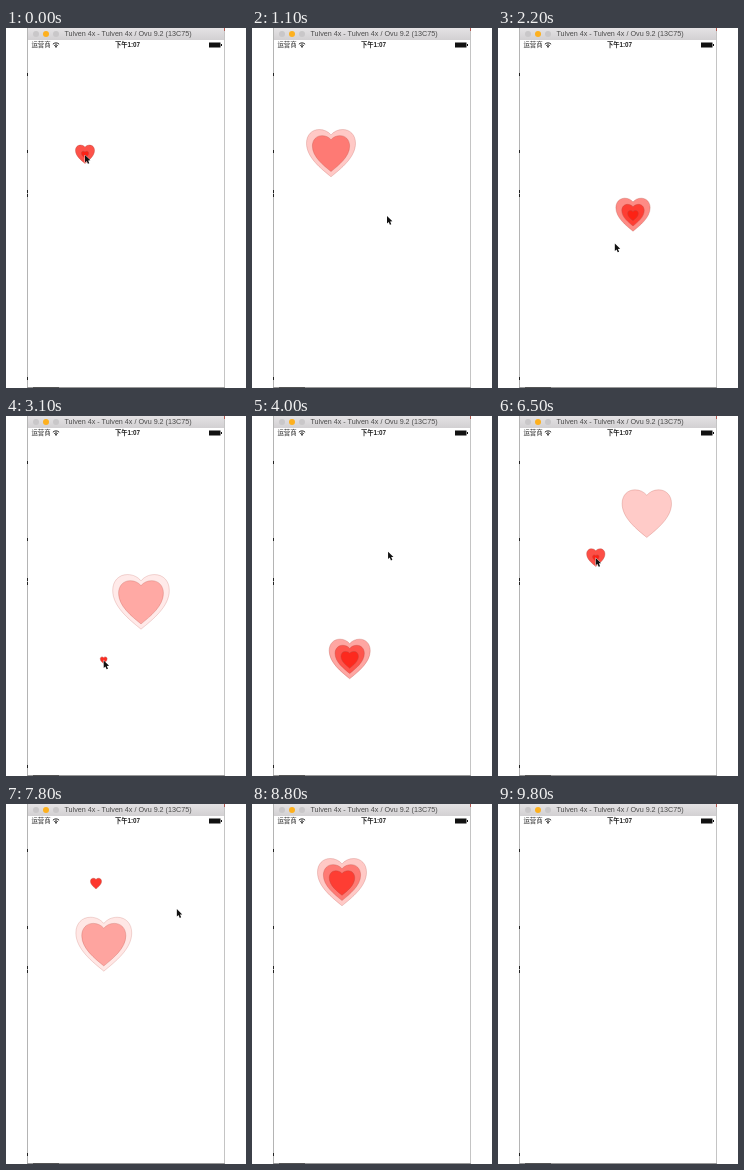
Write an HTML page with a canvas that moves like this. It is 240 by 360 pixels and loops after 10000 ms.

```html
<!DOCTYPE html>
<html>
<head>
<meta charset="utf-8">
<title>Heart taps</title>
<style>
  html, body { margin: 0; width: 100%; height: 100%; overflow: hidden; background: #fff; }
  canvas { position: absolute; left: 0; top: 0; width: 240px; height: 360px; }
  span {
    position: absolute; white-space: nowrap; line-height: 10px;
    transform: translateX(-50%); color: #222;
    font-family: "Liberation Sans", "Noto Sans CJK SC", "Noto Sans CJK", sans-serif;
  }
  .title { left: 122px; top: 1px; font-size: 7.2px; color: #4a4a4a; }
  .carrier { left: 35px; top: 12px; font-size: 6.4px; }
  .clock { left: 121.5px; top: 12px; font-size: 6.3px; font-weight: bold; }
</style>
</head>
<body>
<canvas id="stage"></canvas>
<span class="title">Tulven 4x - Tulven 4x / Ovu 9.2 (13C75)</span>
<span class="carrier">运营商</span>
<span class="clock">下午1:07</span>
<script>
const canvas = document.getElementById('stage');
const ctx = canvas.getContext('2d');
const dpr = window.devicePixelRatio || 1;
canvas.width = 240 * dpr;
canvas.height = 360 * dpr;

const LOOP = 10000, STEP = 100, LAST = 9800;
const SPEED = 38, MAX_SIZE = 60, STAGGER = 0.31, WAVES = 3;

// Each tap sends out growing hearts and is a stop of the pointer
const taps = [
  { t: -0.5, x: 79, y: 127 },
  { t: 1.3, x: 135, y: 188 },
  { t: 2.92, x: 97.7, y: 244.5 },
  { t: 4.58, x: 148.8, y: 99.5 },
  { t: 6.02, x: 97.8, y: 142.3 },
  { t: 7.51, x: 90, y: 80 }
];
const exit = { t: 8.01, x: 235, y: 125 };
const stops = [...taps, exit];

// Heart of unit width, growing around the tap point
const heart = new Path2D();
for (const s of [-1, 1]) {
  heart.moveTo(0, -0.41);
  heart.bezierCurveTo(s * 0.06, -0.48, s * 0.14, -0.52, s * 0.24, -0.52);
  heart.bezierCurveTo(s * 0.39, -0.52, s * 0.5, -0.41, s * 0.5, -0.24);
  heart.bezierCurveTo(s * 0.5, 0.05, s * 0.2, 0.28, 0, 0.445);
}

const arrow = new Path2D('M0 0V7.4L1.7 5.9L2.9 8.8L4.3 8.2L3.1 5.4L5.4 5.3Z');

function rect(x, y, w, h, color) {
  ctx.fillStyle = color;
  ctx.fillRect(x, y, w, h);
}

function dot(x, y, r, color) {
  ctx.fillStyle = color;
  ctx.beginPath();
  ctx.arc(x, y, r, 0, 7);
  ctx.fill();
}

function drawWifi(x, y) {
  ctx.strokeStyle = '#222';
  ctx.lineWidth = 1;
  for (const r of [2.4, 4.4]) {
    ctx.beginPath();
    ctx.arc(x, y, r, -Math.PI * 0.75, -Math.PI * 0.25);
    ctx.stroke();
  }
  dot(x, y - 0.6, 0.9, '#222');
}

function drawWindow() {
  rect(0, 0, 240, 360, '#fff');
  const bar = ctx.createLinearGradient(0, 0, 0, 12);
  bar.addColorStop(0, '#e4e2e4');
  bar.addColorStop(1, '#d2d0d2');
  rect(22, 0, 196, 12, bar);
  ['#c9c7c9', '#fdb01e', '#c9c7c9'].forEach((color, i) => dot(30 + i * 10, 6, 3, color));

  rect(21, 0, 1, 360, '#b4b4b4');
  rect(218, 0, 1, 360, '#c4c4c4');
  rect(21, 359, 198, 1, '#999');
  rect(27, 359, 26, 1, '#555');
  rect(218, 0, 1, 3, '#b4574f');
  for (const y of [45, 122, 162, 166, 349]) rect(21, y, 1, 3, '#222');

  drawWifi(50, 19.3);
  rect(203, 14.5, 11.5, 5, '#111');
  rect(215, 16, 1, 2, '#111');
}

function drawHeart(x, y, size) {
  const fade = 1 - (size / 61) ** 1.25;
  ctx.save();
  ctx.translate(x, y);
  ctx.scale(size, size);
  ctx.globalAlpha = fade;
  ctx.fillStyle = '#fd1e12';
  ctx.fill(heart);
  ctx.globalAlpha = 0.25 + fade * 0.4;
  ctx.strokeStyle = '#b8483e';
  ctx.lineWidth = 0.7 / size;
  ctx.stroke(heart);
  ctx.restore();
}

function drawTap(tap, t) {
  for (let i = 0; i < WAVES; i++) {
    const size = (t - tap.t - i * STAGGER) * SPEED;
    if (size > 0 && size < MAX_SIZE) drawHeart(tap.x, tap.y, size);
  }
}

// Rest after a tap, ease over to the next stop, rest again
function drawPointer(t) {
  const next = stops.findIndex(s => s.t > t);
  if (next < 0) return;
  const a = stops[next - 1], b = stops[next];
  const k = ((t - a.t) / (b.t - a.t) - 0.3) / 0.52;
  const e = Math.min(1, Math.max(0, k));
  const ease = e * e * (3 - 2 * e);
  ctx.save();
  ctx.beginPath();
  ctx.rect(22, 12, 196, 347);
  ctx.clip();
  ctx.translate(a.x + (b.x - a.x) * ease, a.y + (b.y - a.y) * ease);
  ctx.lineWidth = 1;
  ctx.strokeStyle = 'rgba(255, 255, 255, 0.8)';
  ctx.stroke(arrow);
  ctx.fillStyle = '#111';
  ctx.fill(arrow);
  ctx.restore();
}

function draw(ms) {
  const t = Math.min(Math.floor(ms / STEP) * STEP, LAST) / 1000;
  ctx.setTransform(dpr, 0, 0, dpr, 0, 0);
  drawWindow();
  taps.forEach(tap => drawTap(tap, t));
  drawPointer(t);
}

const start = performance.now();
function tick() {
  draw((performance.now() - start) % LOOP);
  requestAnimationFrame(tick);
}
tick();
</script>
</body>
</html>
```
